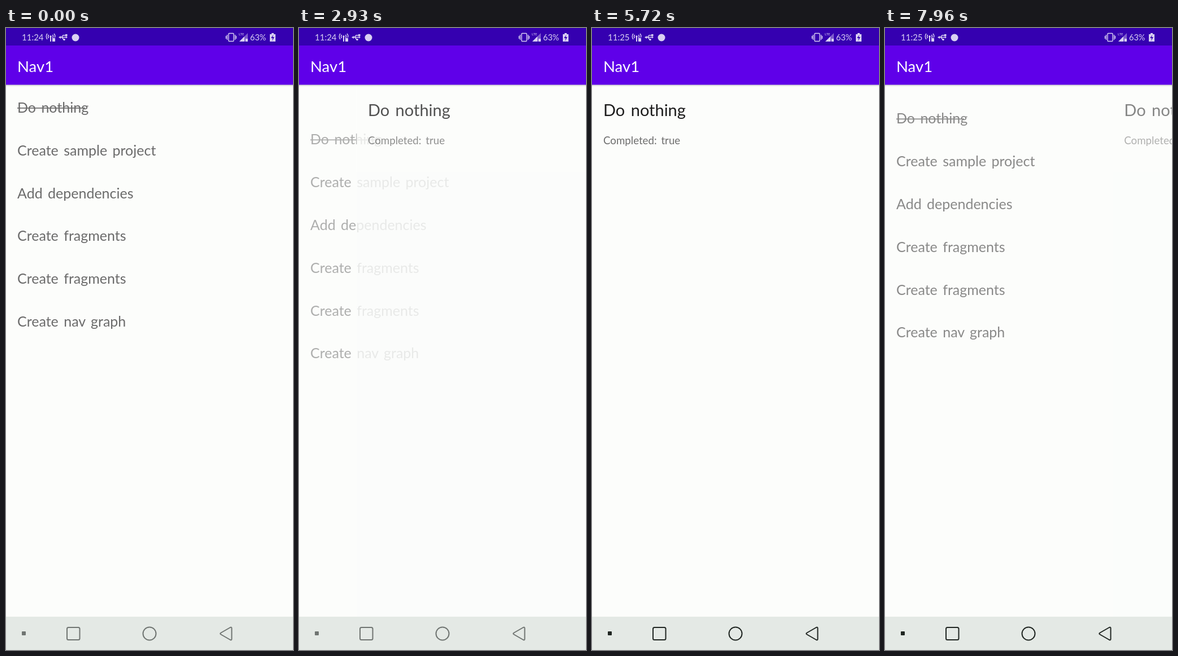
Animation of 508 by 1102 pixels, one loop 7.99 s. Source, as an HTML page:

```html
<!DOCTYPE html>
<html lang="en">
<head>
<meta charset="utf-8">
<title>Task list</title>
<style>
  html, body { margin: 0; width: 100%; height: 100%; overflow: hidden; background: #fcfdfb; }
  svg { display: block; }
  text { font-family: Lato, "Open Sans", sans-serif; word-spacing: 3px; }
</style>
</head>
<body>
<svg width="508" height="1102" viewBox="0 0 508 1102">
  <defs>
    <linearGradient id="shade" x2="0" y2="1">
      <stop offset="0" stop-color="#b4b2bc"/>
      <stop offset="1" stop-color="#fcfdfb" stop-opacity="0"/>
    </linearGradient>
  </defs>
  <rect width="508" height="1102" fill="#fcfdfb"/>

  <g id="list" fill="#6b6b6b" font-size="25"></g>

  <g id="detail">
    <rect y="100" width="508" height="943" fill="#fcfdfb"/>
    <text x="20" y="156" font-size="29" fill="#1c1c1c">Do nothing</text>
    <text x="20" y="206" font-size="18.7" fill="#6e6e6e">Completed: true</text>
  </g>

  <rect y="100" width="508" height="5" fill="url(#shade)"/>
  <rect y="31" width="508" height="69.5" fill="#5f00e9"/>
  <text x="20" y="78" font-size="27.5" fill="#fff">Nav1</text>

  <rect width="508" height="31" fill="#3500b0"/>
  <g fill="#d9d0f2" font-size="15">
    <text id="clock" x="28" y="22"></text>
    <text x="432" y="22" font-size="14.5">63%</text>
    <text x="412" y="13" font-size="6">LTE</text>
    <circle cx="123" cy="17" r="6.5"/>
    <circle cx="79" cy="15" r="1.7"/>
    <path d="M78 16h2v8h-2zM82 18h5v6h-5z"/>
    <path d="M93 16.5l4-2.5v5zM105 11h3.5v3.5H105zM109 16.5l-3-2v4z"/>
    <circle cx="103" cy="20.5" r="1.8"/>
    <path d="M428 9v15h-15z" opacity=".45"/>
    <path d="M422 15v9h-9z"/>
    <path d="M424 19h4v5h-4z"/>
    <path d="M470 9h4v2h3v13h-10V11h3z"/>
    <path d="M473 12l-4 6h3l-1 5 4-7h-3z" fill="#3500b0"/>
    <g fill="none" stroke="#d9d0f2" stroke-width="1.4">
      <path d="M75.5 12q-2 3 0 6M82.5 12q2 3 0 6M73 10q-3.5 5 0 10M85 10q3 4 1 7"/>
      <path d="M96 16.5h11M98 16.5l3-3.5h4M99 16.5l3 4"/>
      <rect x="394" y="9.5" width="9" height="14" rx="1"/>
      <path d="M391.5 12v9M405.5 12v9M389.5 14v5M407.5 14v5"/>
    </g>
  </g>

  <rect y="1043" width="508" height="59" fill="#e4e9e5"/>
  <g id="nav" fill="none" stroke-width="2" stroke-linejoin="round">
    <rect x="29" y="1070" width="5" height="5" fill="currentColor"/>
    <rect x="108" y="1062" width="22.5" height="22" rx="2.5"/>
    <circle cx="254" cy="1073" r="11.5"/>
    <path d="M380.5 1071.5L397 1062q2.5-1.2 2.5 1.5v19q0 2.7-2.5 1.5L380.5 1074.5q-2.500-1.500 0-3z"/>
  </g>
</svg>
<script>
const LOOP = 7990, SLIDE = 3000, OPEN = 1241, CLOSE = 5861;
const CLOCK_TICK = 3500, NAV_WAKE = 5700;
const WIDTH = 508, DROP = 94.2, FADED = 0.4;
const $ = id => document.getElementById(id);
const list = $('list'), detail = $('detail'), clock = $('clock'), nav = $('nav');

const tasks = ['Do nothing', 'Create sample project', 'Add dependencies',
  'Create fragments', 'Create fragments', 'Create nav graph'];
list.innerHTML = tasks.map((task, i) =>
  `<text x="20" y="${150 + i * 75.8}">${task}</text>`).join('') +
  '<rect x="20" y="141" width="120" height="1.7"/>';

const mix = (a, b, k) => a + (b - a) * k;
// Accelerate then decelerate, clamped to the slide's duration.
const ease = (t, start) => {
  const p = Math.min(1, Math.max(0, (t - start) / SLIDE));
  return (1 - Math.cos(Math.PI * p)) / 2;
};

function place(node, x, y, alpha) {
  node.setAttribute('transform', `translate(${x} ${y})`);
  node.setAttribute('opacity', alpha);
}

function draw(t) {
  if (t < CLOSE) {
    const k = ease(t, OPEN);
    place(list, 0, DROP * k, 1 - k ** 1.5);
    place(detail, mix(WIDTH / 2, 0, k), 0, k > 0 ? mix(FADED, 1, k) : 0);
  } else {
    const k = ease(t, CLOSE);
    place(list, 0, DROP * (1 - k), k);
    place(detail, WIDTH * k, 0, mix(1, FADED, k));
  }
  clock.textContent = t < CLOCK_TICK ? '11:24' : '11:25';
  const ink = t < NAV_WAKE ? '#707572' : '#202622';
  nav.setAttribute('stroke', ink);
  nav.setAttribute('color', ink);
}

const begin = performance.now();
function tick() {
  draw((performance.now() - begin) % LOOP);
  requestAnimationFrame(tick);
}
tick();
</script>
</body>
</html>
```
